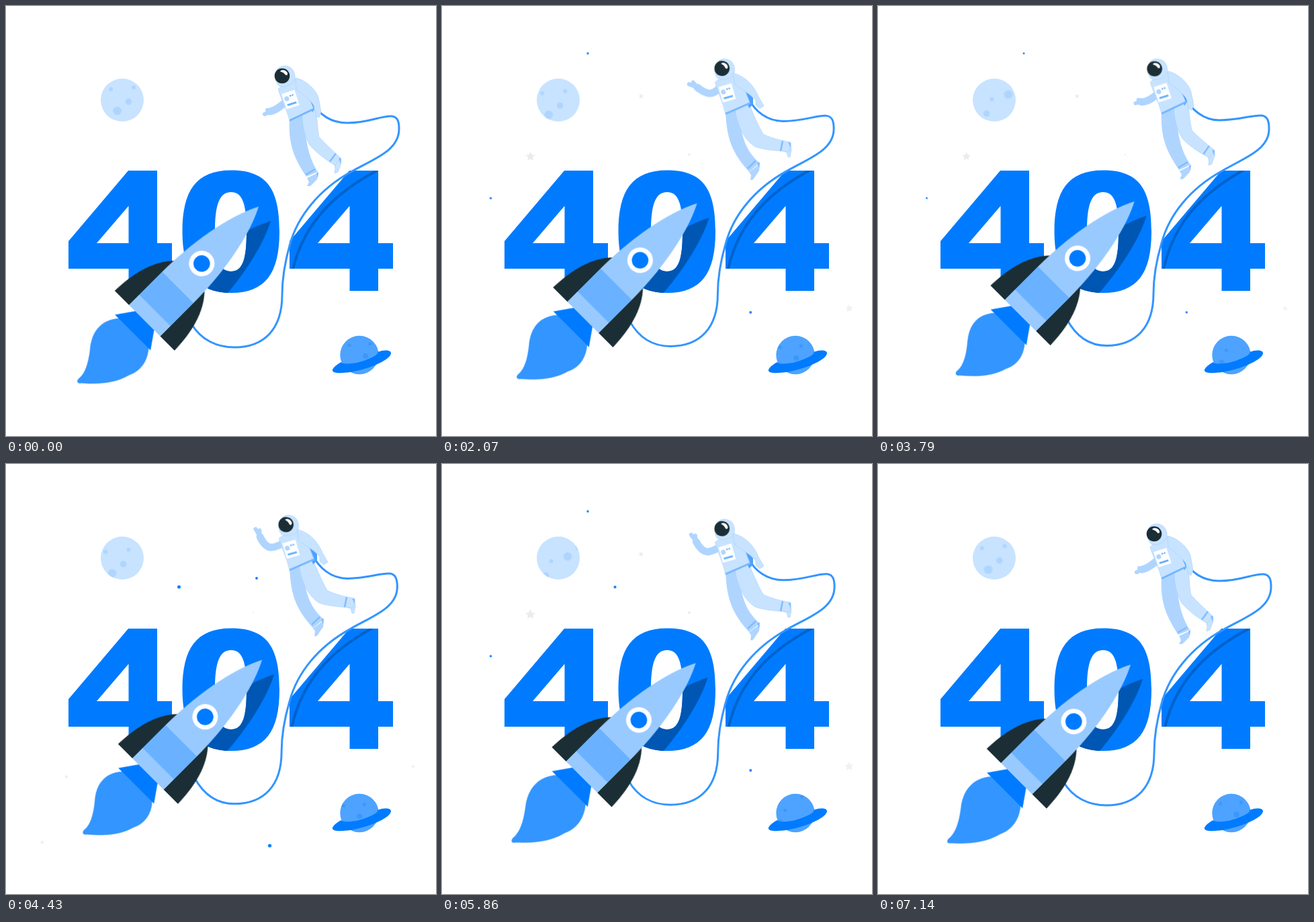
An HTML page without scripts for the animation above (7210 ms loop, 640 px wide and 640 px high).

```html
<!DOCTYPE html>
<html lang="en">
<head>
<meta charset="utf-8">
<title>404</title>
<style>
  :root { --loop: 7.21s; --half: calc(var(--loop) / 2); --spin: calc(var(--loop) / 3); --blink: calc(var(--loop) / 4); }
  html, body { margin: 0; width: 100%; height: 100%; overflow: hidden; background: #fff; }
  svg { display: block; width: 100%; height: 100%; }

  .blue { fill: #007bff; }
  .light { fill: #c8e3ff; }
  .mid { fill: #afd5ff; }
  .dark { fill: #1b2e35; }
  .suit { stroke: #a3cfff; stroke-width: .6; }
  .line { fill: none; stroke: #3395ff; stroke-width: 3; }
  .limb { fill: none; stroke: #afd5ff; stroke-linecap: round; stroke-linejoin: round; }
  .cuff { fill: none; stroke: #80bdff; stroke-width: 2.5; }

  /* slow float, out and back */
  .rocket, .bob, .sway { animation: var(--half) ease-in-out infinite alternate; }
  .rocket { animation-name: fly; }
  .bob { animation-name: bob; }
  .sway { animation-name: sway; }
  @keyframes fly { to { transform: translate(5.7px, -7.8px); } }
  @keyframes bob { to { transform: translateY(-10px); } }
  @keyframes sway { from { d: var(--a); } to { d: var(--b); } }

  .flame { transform-origin: 0 255px; animation: burn calc(var(--loop) / 24) -.15s ease-in-out infinite alternate; }
  @keyframes burn { from { transform: scaleY(1.05); } to { transform: scaleY(.95); } }

  /* limbs go from rest (a) to stretched (b) and back; the far arm also waves (c) */
  .pose { animation: pose var(--half) ease-in-out infinite; }
  .wave { animation: wave var(--half) ease-in-out infinite; }
  .torso { transform-origin: 435px 165px; animation: lean var(--half) ease-in-out infinite; }
  .head { transform-origin: 418px 122px; animation: nod var(--half) ease-in-out infinite; }
  @keyframes pose { 0%, 90%, 100% { d: var(--a); } 22%, 65% { d: var(--b); } }
  @keyframes wave { 0%, 90%, 100% { d: var(--a); } 22%, 44%, 65% { d: var(--b); } 33%, 56% { d: var(--c); } }
  @keyframes lean { 0%, 90%, 100% { transform: none; } 22%, 65% { transform: translateY(-3.2px) rotate(2deg); } }
  @keyframes nod { 0%, 90%, 100% { transform: none; } 22%, 65% { transform: rotate(11deg); } }

  .craters { animation: roll var(--spin) linear infinite; }
  @keyframes roll { to { transform: translate(var(--x), var(--y)); } }

  .tw { animation: twinkle var(--blink) calc((var(--d) - 1) * var(--blink)) infinite; }
  @keyframes twinkle { 0%, 50%, 100% { transform: scale(0); } 20%, 38% { transform: scale(1); } }
</style>
</head>
<body>
<svg viewBox="0 0 640 640" role="img" aria-label="404">
  <defs>
    <path id="four" clip-rule="evenodd" fill-rule="evenodd" d="M182 245H225V353H247V391H225V424H182.500V391H93V350ZM182.500 297.500L135 353H182.500Z"/>
    <path id="zero" clip-rule="evenodd" fill-rule="evenodd" d="M335 244.500C389 244.500 407 273 407 335.500S386 427 335 427S262.500 396 262.500 335.500S283 244.500 335 244.500ZM335 277C317 277 311 297 311 336S317 395 335 395S358 375 358 336S353 277 335 277Z"/>
    <path id="body" d="M0 0C16 30 33 90 33 175V240H-33V175C-33 90 -16 30 0 0Z"/>
    <path id="fin" class="dark" d="M33 240H63C62 208 56 168 29 143Z"/>
    <path id="star" d="M0-1L.29-.4.95-.31.48.15.59.81 0 .5-.59.81-.48.15-.95-.31-.29-.4Z"/>
    <g id="moonpits">
      <circle cx="156" cy="124" r="3"/><circle cx="190" cy="121" r="3"/>
      <circle cx="182.300" cy="142.300" r="4.800"/><circle cx="165.500" cy="156" r="6.300"/>
    </g>
    <g id="planetpits">
      <circle cx="511" cy="505" r="2.500"/><circle cx="542" cy="503" r="2.500"/><circle cx="535" cy="521" r="4"/>
    </g>
    <clipPath id="moonclip"><circle cx="173" cy="140" r="32"/></clipPath>
    <clipPath id="planetclip"><circle cx="526" cy="519.500" r="28.700"/></clipPath>
    <clipPath id="zeroclip"><use href="#zero"/></clipPath>
    <clipPath id="fourclip"><use href="#four" x="329"/></clipPath>
  </defs>

  <!-- sparkles -->
  <g class="blue">
    <g transform="translate(217 70.500)"><circle class="tw" r="1.700" style="--d:0"/></g>
    <g transform="translate(72.500 286)"><circle class="tw" r="1.700" style="--d:0"/></g>
    <g transform="translate(459.300 456)"><circle class="tw" r="1.900" style="--d:-.01"/></g>
    <g transform="translate(257.500 183)"><circle class="tw" r="2.500" style="--d:.15"/></g>
    <g transform="translate(373 170)"><circle class="tw" r="1.900" style="--d:.27"/></g>
    <g transform="translate(392.500 568)"><circle class="tw" r="2.600" style="--d:.27"/></g>
    <g transform="translate(586 109.500)"><circle class="tw" r="2" style="--d:.47"/></g>
  </g>
  <g fill="#ebebeb">
    <g transform="translate(131.500 224) scale(7.500)"><use href="#star" class="tw" style="--d:-.01"/></g>
    <g transform="translate(296.300 134.300) scale(4)"><use href="#star" class="tw" style="--d:-.01"/></g>
    <g transform="translate(606 450) scale(7)" opacity=".7"><use href="#star" class="tw" style="--d:.04"/></g>
    <g transform="translate(512 589) scale(7)" opacity=".7"><use href="#star" class="tw" style="--d:.47"/></g>
    <g transform="translate(54 563) scale(3.500)" opacity=".8"><use href="#star" class="tw" style="--d:.22"/></g>
    <g transform="translate(90 465.500)"><circle class="tw" r="2" style="--d:.24"/></g>
    <g transform="translate(368 221.300)"><circle class="tw" r="1.900" style="--d:.04"/></g>
    <g transform="translate(267 114)"><circle class="tw" r="1.600" style="--d:.47"/></g>
  </g>

  <!-- moon -->
  <circle class="light" cx="173" cy="140" r="32"/>
  <g clip-path="url(#moonclip)" class="mid">
    <g class="craters" style="--x:49px;--y:-42px"><use href="#moonpits"/><use href="#moonpits" x="-49" y="42"/></g>
  </g>

  <!-- ringed planet -->
  <circle fill="#4da3ff" cx="526" cy="519.500" r="28.700"/>
  <g clip-path="url(#planetclip)" fill="#3d97f7">
    <g class="craters" style="--x:56px;--y:-22px"><use href="#planetpits"/><use href="#planetpits" x="-56" y="22"/></g>
  </g>
  <path class="blue" d="M499 530C490 535 485 540 486 543C488 548 508 547 530 541C556 534 574 523 573 516C572 512 564 511 553 515C556 519 538 527 522 531C510 533 500 533 499 530Z"/>

  <!-- digits with cast shadows -->
  <g class="blue"><use href="#four"/><use href="#zero"/><use href="#four" x="329"/></g>
  <g clip-path="url(#zeroclip)">
    <g class="rocket"><use href="#body" fill="#0056b3" transform="translate(394 320) rotate(45)"/></g>
  </g>
  <g clip-path="url(#fourclip)">
    <path class="sway" fill="none" stroke="#0062cc" stroke-width="4"
      style="--a:path('M556 243C500 272 445 315 427 392');--b:path('M546 243C494 272 442 313 425 392')"/>
  </g>

  <path class="line sway" style="
    --a:path('M456 143C466 162 484 174 508 174C540 174 558 163 574 164C583 165 585 172 585 183C585 216 546 228 514 246.500C466 273 434 313 422.500 355C412 392 411 415 411 430C411 480 385 508 340 508C314 508 290 497 276 473');
    --b:path('M456 134C466 154 484 170 508 170C538 170 556 162 571 163C580 164 582 172 582 183C582 215 543 227 512 245.500C464 272 433 311 422 353C411 390 410 413 410 428C410 478 384 505.500 340 505.500C316 505.500 296 494 281 466')"/>

  <g class="rocket">
    <g transform="translate(376 298.600) rotate(45)">
      <path class="flame" fill="#3395ff" d="M-24.700 259.500C-50 284-43 309-27.600 327.400C-12 347-7 360.600-8.500 370.500C-8 377-3.500 377-.7 372.600C24 351 36 333 41 314C49 298 47 279 31 262Z"/>
      <path class="blue" d="M-20 240H20L37.500 265H-37.500Z"/>
      <use href="#fin"/><use href="#fin" transform="scale(-1 1)"/>
      <use href="#body" fill="#99caff"/>
      <path fill="#6ab2ff" d="M-33 170H33V218.500H-33Z"/>
      <circle cy="119.700" r="19" fill="#fff"/>
      <circle cy="119.700" r="12.300" class="blue"/>
    </g>
  </g>

  <!-- astronaut -->
  <g class="bob">
    <path class="limb wave" stroke-width="11" style="
      --a:path('M415 144C408 150 400 156 393 157');
      --b:path('M412 127C397 135 388 138 378 117');
      --c:path('M412 129C403 140 394 138 380 128')"/>
    <path class="limb wave" stroke-width="6" style="
      --a:path('M392 158L385 161M392 157L389 155');
      --b:path('M376.500 114L371.500 105.500M377 114L377.500 107.500');
      --c:path('M378 127L367.500 123.500M379 127L373.500 120.500')"/>

    <path class="mid pose" style="
      --a:path('M448 256L465 248L463 258L453 268L448 268L451 262Z');
      --b:path('M457 253.500L473 241.500L472 251.500L463 264.500L459 265.500L460 257.500Z')"/>
    <path class="mid pose" style="
      --a:path('M422 168C420 205 428 225 447 254L464 247C452 227 446 208 443 160Z');
      --b:path('M422 164C424 205 432 225 457 253L473 240C455 224 445 207 441 158Z')"/>
    <path class="cuff pose" style="--a:path('M446 251L460 243');--b:path('M455 248L467 236.500')"/>
    <path class="pose" fill="#80bdff" style="
      --a:path('M462 249L465 247L464 256Z');--b:path('M469 240L473 239L472 247Z')"/>

    <path class="light suit pose" style="
      --a:path('M489 236L498 226L499 234L494 247L489 249L490 243Z');
      --b:path('M507 222L519 209.500L520 221L518 231L515 231L513 224Z')"/>
    <path class="light suit pose" style="
      --a:path('M441 162L461 154C464 170 463 182 466 195C475 205 488 217 498 226L490 237C478 231 462 218 452 207C445 195 441 180 441 162Z');
      --b:path('M436 160L456 150C464 168 470 183 478 197C488 202 502 206 519 209L517 223C500 222 475 220 465 215C450 205 440 186 436 160Z')"/>
    <path class="cuff pose" style="--a:path('M482 231.500L491 219.500');--b:path('M504 222L507 207')"/>
    <path class="pose" fill="#80bdff" style="
      --a:path('M495 226L499 227L498 235Z');--b:path('M515 209L519 210L519 217Z')"/>

    <path class="pose" fill="#4da0ff" style="
      --a:path('M440 118L448 124L458 139L460 152L456 158Z');
      --b:path('M443 120L453 126L463 143L463 153L457 158Z')"/>
    <g class="torso">
      <path class="light suit" d="M405 124C408 118 422 119 430 109C438 112 444 120 448 130L458 153L422 170C418 154 410 140 405 124Z"/>
      <path fill="none" stroke="#73b7ff" stroke-width="3" d="M422 170.500L458.500 153"/>
      <g transform="translate(423.500 139.300) rotate(-18)">
        <path fill="#fff" d="M-10-12H10V12H-10Z"/>
        <circle cx="-5" cy="-3" r="3.600" class="mid"/>
        <g fill="#66b0ff"><circle cx="1.500" cy="-5.500" r="1.300"/><circle cx="5" cy="-5.500" r="1.300"/><path d="M-7 5H7V8H-7Z"/></g>
      </g>
      <g class="head">
        <path class="light suit" d="M402 98C404 90 413 88 420 90C428 93 431 101 430 109C426 118 416 121 408 120C402 116 399 106 402 98Z"/>
        <circle class="dark" cx="411" cy="104" r="11.300"/>
        <path fill="#fff" d="M408 97C412 93 420 97 419 102C417 105 415 101 413 99.500C411 98 409 98.500 408 97Z"/>
      </g>
    </g>

    <path class="light suit pose" style="
      --a:path('M431 107C446 110 461 124 465 136L469 158L466 166L462 164L458 148C452 138 440 130 432 124Z');
      --b:path('M433 106C452 111 464 124 471 141L479 155L473 159L467 154L467 147C460 138 447 131 436 123Z')"/>
  </g>
</svg>
</body>
</html>
```
